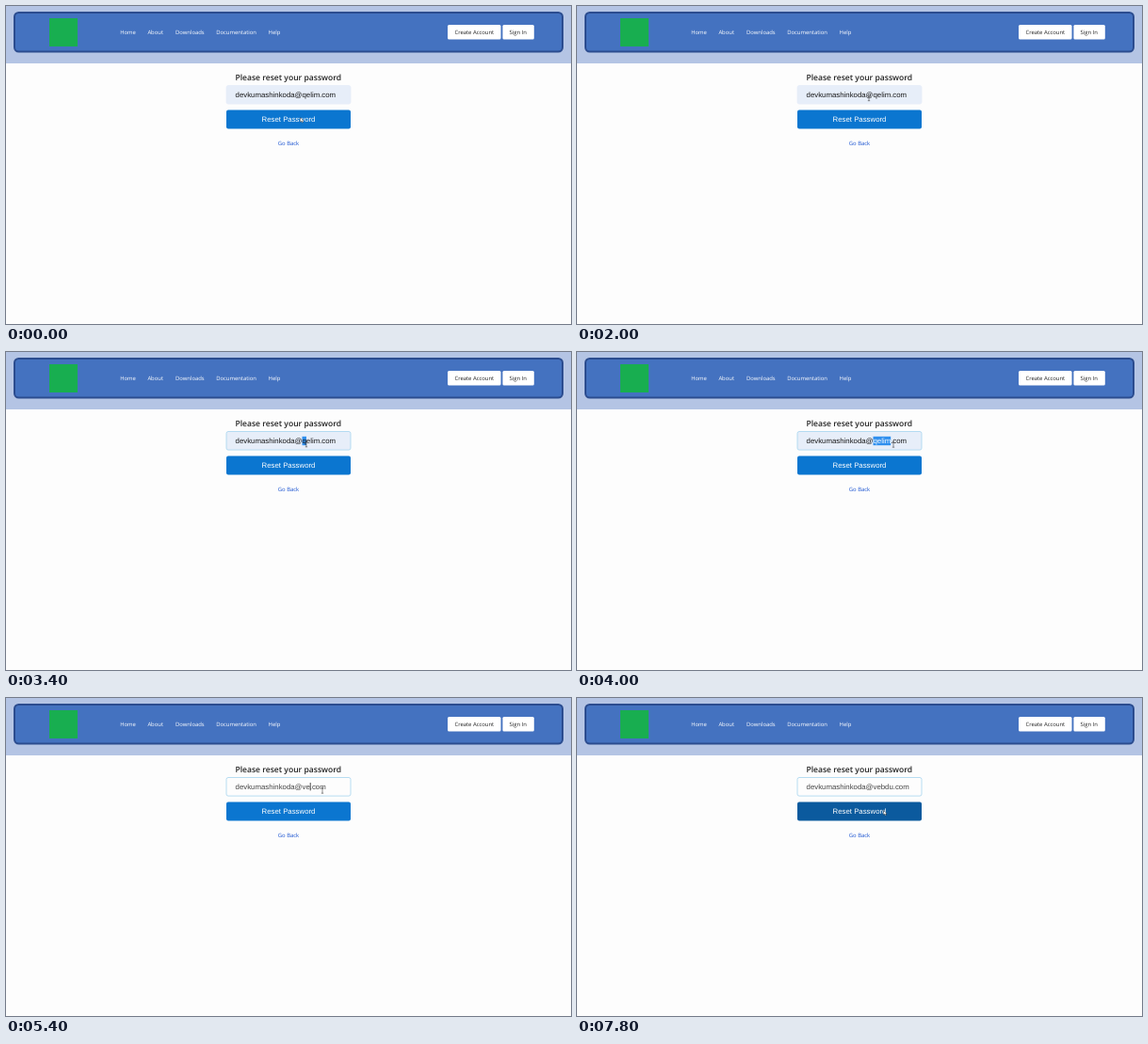
An HTML page for the animation above (8000 ms loop, 600 by 338 pixels).

```html
<!DOCTYPE html>
<html lang="en">
<head>
<meta charset="utf-8">
<title>Reset password</title>
<style>
  html, body { margin: 0; width: 100%; height: 100%; overflow: hidden; background: #fdfdfd; }
  svg { display: block; width: 600px; height: 338px; text-rendering: geometricPrecision; }
  .ui { font: 5.9px "Open Sans", "Noto Sans", sans-serif; }
  .field { font: 7.82px "Liberation Sans", Arial, sans-serif; }
  .middle { text-anchor: middle; }
  .title { font-size: 8.55px; font-weight: 600; fill: #222; }
</style>
</head>
<body>
<svg viewBox="0 0 600 338">
  <rect width="600" height="338" fill="#fdfdfd"/>
  <rect width="600" height="61" fill="#b4c4e4"/>
  <rect x="9" y="7" width="582" height="41.5" rx="4.5" fill="#4472c0" stroke="#2b4c8f" stroke-width="2"/>
  <rect x="46" y="13" width="30" height="30" fill="#18ae50"/>

  <g class="ui" fill="#fff">
    <text x="121.2" y="30">Home</text>
    <text x="150.4" y="30">About</text>
    <text x="180" y="30">Downloads</text>
    <text x="223.2" y="30">Documentation</text>
    <text x="278.6" y="30">Help</text>
    <rect x="469" y="20" width="56.5" height="15.6" rx="1.5"/>
    <rect x="527.4" y="20" width="33.4" height="15.6" rx="1.5"/>
  </g>
  <g class="ui middle" fill="#222">
    <text x="497.3" y="30">Create Account</text>
    <text x="543.8" y="30">Sign In</text>
    <text class="title" x="299.8" y="79.2">Please reset your password</text>
    <text x="300" y="147.7" fill="#1650d0">Go Back</text>
  </g>

  <rect id="box" x="234" y="84.5" width="132" height="19.6" rx="2" stroke-width=".8"/>
  <rect id="selection" y="89.8" height="9.4" fill="#2f8fee"/>
  <text id="email" class="field" x="243.6" y="97"><tspan id="before"></tspan><tspan id="domain"></tspan><tspan>.com</tspan></text>
  <rect id="caret" y="90" width=".8" height="8.4" fill="#222"/>

  <rect id="button" x="234" y="110.6" width="132" height="19.8" rx="2"/>
  <text class="field middle" x="300" y="122.9" fill="#fff">Reset Password</text>

  <path id="beam" d="M-1.2-2.7H1.2M0-2.7V2.7M-1.2 2.7H1.2" fill="none" stroke="#444" stroke-width=".6"/>
  <path id="arrow" d="M-1.4-2.6V2.2L-.3 1.3.5 3 1.3 2.6.6 1H2Z" fill="#fff" stroke="#222" stroke-width=".4"/>
</svg>
<script>
const LOOP = 8000, STEP = 200;
const USER = "devkumashinkoda@", OLD = "qelim", NEW = "vebdu";
const FOCUS = 3000, DRAG_START = 3200, DRAG_END = 3800, CLEARED = 4600, LEAVE = 7000;
const TYPED = [5000, 5200, 5600, 5800, 6000];

// time, x, y
const POINTER = [
  [0, 314, 121], [400, 314, 121], [1000, 307, 98], [1600, 307, 98],
  [2400, 313, 98], [DRAG_START, 313, 98], [DRAG_END, 336, 98.5],
  [LEAVE, 336, 98.5], [7600, 327, 122], [LOOP, 327, 122]
];

const el = Object.fromEntries([...document.querySelectorAll("[id]")].map(n => [n.id, n]));
const set = (node, attrs) => {
  for (const name in attrs) node.setAttribute(name, attrs[name]);
};
const show = (node, on) => set(node, { visibility: on ? "visible" : "hidden" });

function pointerAt(t) {
  const i = POINTER.findIndex(p => p[0] > t);
  const [t0, x0, y0] = POINTER[i - 1], [t1, x1, y1] = POINTER[i];
  const p = (t - t0) / (t1 - t0), ease = p * p * (3 - 2 * p);
  return [x0 + (x1 - x0) * ease, y0 + (y1 - y0) * ease];
}

function draw(t) {
  const edited = t >= CLEARED, focused = t >= FOCUS;
  const typed = TYPED.filter(at => at <= t).length;
  const [x, y] = pointerAt(t);

  el.before.textContent = USER;
  el.domain.textContent = edited ? NEW.slice(0, typed) : OLD;
  set(el.email, { fill: edited ? "#444" : "#161616" });
  set(el.box, {
    fill: edited ? "#fdfdfd" : "#e7eef9",
    stroke: focused ? "#a5d5ef" : "#e7eef9"
  });

  const start = 243.6 + el.before.getComputedTextLength();
  const width = edited && !typed ? 0 : el.domain.getComputedTextLength();
  const dragging = t > DRAG_START && !edited;
  const full = t >= DRAG_END && !edited;
  set(el.selection, {
    x: start,
    width: dragging ? Math.max(0, Math.min(width, x - start)) : 0
  });
  set(el.domain, { fill: full ? "#fff" : "inherit" });

  const recent = TYPED.some(at => t >= at && t - at < 400);
  show(el.caret, edited && (recent || t % 1000 < 500));
  set(el.caret, { x: start + width });

  const onButton = y > 110.6;
  set(el.button, { fill: onButton && t > LEAVE ? "#0b5a9e" : "#0b76d0" });
  for (const cursor of [el.beam, el.arrow]) set(cursor, { transform: `translate(${x} ${y})` });
  show(el.beam, !onButton);
  show(el.arrow, onButton);
}

function tick() {
  draw(Math.floor(performance.now() % LOOP / STEP) * STEP);
  requestAnimationFrame(tick);
}
tick();
</script>
</body>
</html>
```
